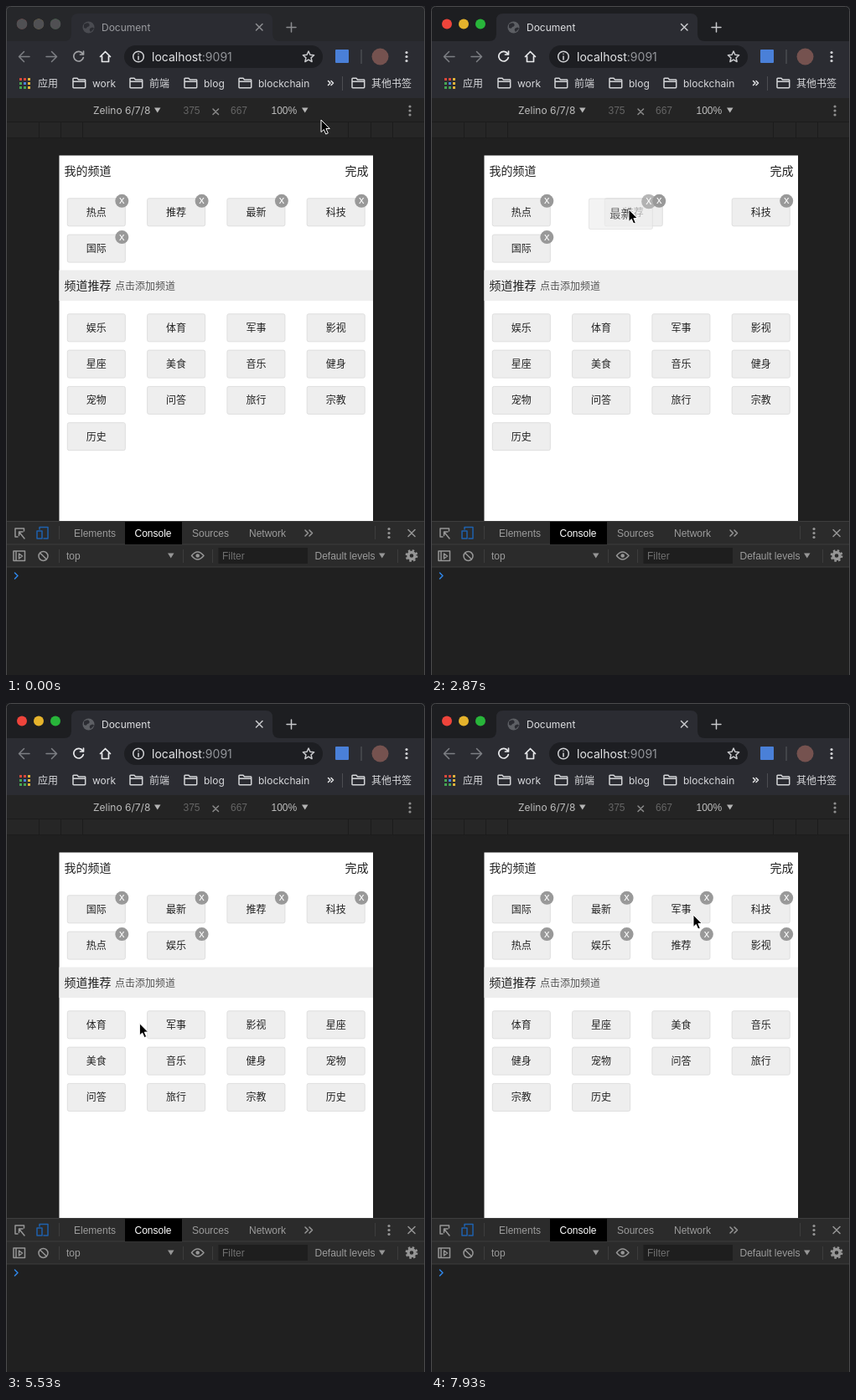
An HTML page for the animation above (8 s loop, 500 by 799 pixels).

```html
<!DOCTYPE html>
<html lang="zh-CN">
<head>
<meta charset="utf-8">
<title>Document</title>
<style>
  html, body { margin: 0; width: 100%; height: 100%; overflow: hidden; background: #202020; }
  svg { display: block; }
  text { font-family: Inter, "Noto Sans CJK SC", "Noto Sans CJK", sans-serif; font-size: 12px; }
  .cjk text { font-family: "Noto Sans CJK SC", "Noto Sans CJK", sans-serif; fill: #222; }
  .cjk .head { font-size: 14px; }
  .cjk .x { font: 13px "Liberation Sans", Arial, sans-serif; fill: #fff; }
  .dev text { font-family: "Liberation Sans", Arial, sans-serif; fill: #9c9c9c; }
  .line { fill: none; stroke-width: 1.5; stroke-linecap: round; stroke-linejoin: round; }
  .mid { text-anchor: middle; }
  .idle { animation: idle 8s step-end infinite; }
  .wake { animation: wake 8s step-end infinite; }
  .focus { animation: focus 8s step-end infinite; }
  @keyframes idle { 0% { opacity: 1; } 7.5%, to { opacity: 0; } }
  @keyframes wake { 0% { opacity: .62; } 7.5%, to { opacity: 1; } }
  @keyframes focus { 0% { opacity: 0; } 7.5% { opacity: 1; } 22.5%, to { opacity: 0; } }
</style>
</head>
<body>
<svg width="500" height="799" viewBox="0 0 500 799">
  <defs>
    <path id="folder" class="line" stroke="#d4d5d8" stroke-width="1.3"
      d="M1 11.5V1.5Q1 .8 1.7.8H6L7.5 2.6H15Q15.7 2.6 15.7 3.3V11.5Q15.7 12.2 15 12.2H1.7Q1 12.2 1 11.5ZM1 4.8H15.7"/>
    <g id="dots"><circle cy="-5" r="1.6"/><circle r="1.6"/><circle cy="5" r="1.6"/></g>
    <path id="down" d="M0 0H7.5L3.75 6Z"/>
  </defs>

  <!-- title bar -->
  <rect width="500" height="799" fill="#202020"/>
  <rect width="500" height="44" fill="#1d1e21"/>
  <rect class="idle" width="500" height="44" fill="#26272a"/>
  <circle cx="19" cy="21.5" r="6" fill="#ee443b"/>
  <circle cx="39" cy="21.5" r="6" fill="#e5b32c"/>
  <circle cx="59" cy="21.5" r="6" fill="#28b53a"/>
  <g class="idle" fill="#505053">
    <circle cx="19" cy="21.5" r="6.3"/><circle cx="39" cy="21.5" r="6.3"/><circle cx="59" cy="21.5" r="6.3"/>
  </g>
  <path fill="#2b2c32" d="M69 42Q78 42 78 33V17Q78 9 86 9H310Q318 9 318 17V33Q318 42 327 42H500V110H0V42Z"/>
  <g class="wake">
    <circle cx="98.5" cy="25.5" r="7" fill="#5d5f64"/>
    <path fill="#2b2c32" d="M93 22Q97 19 99 21Q101 24 97 25Q96 28 93 26ZM100 27Q104 24 105 27L101 31Q99 29 100 27Z"/>
    <text x="114" y="29.5" fill="#dfe0e3">Document</text>
    <path class="line" stroke="#c9cacd" d="M298.5 21.5L306 29M306 21.5L298.5 29"/>
    <path class="line" stroke="#c9cacd" d="M335 25.5H346M340.5 20V31"/>
  </g>

  <!-- navigation -->
  <g class="line">
    <path stroke="#7d7f84" d="M28 60.5H16M21.5 54.5L15.5 60.5L21.5 66.5M48 60.5H60M54.5 54.5L60.5 60.5L54.5 66.5"/>
    <path class="wake" stroke="#e8e9eb" stroke-width="1.7" d="M91.5 57A5.8 5.8 0 1 0 92.3 61.5M92.5 54V58H88.5"/>
    <path stroke="#e8e9eb" stroke-width="1.7" d="M112.5 60.5L118.5 54.5L124.5 60.5M114.5 60V66.5H122.5V60"/>
  </g>
  <rect x="141" y="47" width="237" height="27" rx="13.5" fill="#1d1e22"/>
  <circle class="line" cx="158" cy="60.5" r="6.3" stroke="#d2d3d6"/>
  <path class="line" stroke="#d2d3d6" d="M158 60V64M158 57.2V57.3"/>
  <text x="174" y="65.5" style="font-size:14px" fill="#e4e5e7">localhost<tspan fill="#93959a">:9091</tspan></text>
  <path class="line" stroke="#c9cacd" d="M361 54L362.9 58.3L367.6 58.8L364.1 61.9L365.1 66.5L361 64.1L356.9 66.5L357.9 61.9L354.4 58.8L359.1 58.3Z"/>
  <rect x="393" y="52" width="16" height="16" rx="1" fill="#4a80d8"/>
  <path stroke="#5b5c61" d="M424 52V69"/>
  <circle cx="446.5" cy="60.5" r="10" fill="#75524f"/>
  <use href="#dots" x="478" y="60.5" fill="#d2d3d6"/>

  <!-- bookmarks -->
  <g id="apps"></g>
  <g fill="#d8d9dc">
    <use href="#folder" x="79" y="85.5"/><use href="#folder" x="147" y="85.5"/>
    <use href="#folder" x="212" y="85.5"/><use href="#folder" x="277" y="85.5"/>
    <use href="#folder" x="412" y="85.5"/>
    <text x="38" y="96.5">应用</text><text x="103" y="96.5">work</text>
    <text x="171" y="96.5">前端</text><text x="236" y="96.5">blog</text>
    <text x="301" y="96.5">blockchain</text><text x="436" y="96.5">其他书签</text>
  </g>
  <path class="line" stroke="#e4e5e7" d="M384.5 89.5L387 92L384.5 94.5M388 89.5L390.5 92L388 94.5"/>
  <path stroke="#4c4d52" d="M401.5 84V101"/>

  <!-- device bar -->
  <g class="dev">
    <rect y="110" width="500" height="28" fill="#242424"/>
    <rect class="focus" x="96" y="114" width="92" height="21" fill="#3a3a3a"/>
    <text x="104" y="128.5" style="font-family:Inter,sans-serif;fill:#bdbdbd">Zelino 6/7/8</text>
    <g fill="#b5b5b5"><use href="#down" x="177" y="121.5"/><use href="#down" x="353" y="121.5"/></g>
    <g opacity=".55"><text x="211.5" y="128.5">375</text><text x="268" y="128.5">667</text></g>
    <path class="line" stroke="#8a8a8a" d="M247 123L253.5 129.5M253.5 123L247 129.5"/>
    <text x="316.5" y="128.5" style="fill:#bdbdbd">100%</text>
    <use href="#dots" x="482" y="125" fill="#8f8f8f"/>
    <rect y="138" width="500" height="19" fill="#262626"/>
    <path stroke="#1c1c1c" d="M0 138.5H500M39.5 139V157M65.5 139V157M91.5 139V157M408.5 139V157M435.5 139V157M461.5 139V157M0 157.5H500"/>
  </g>

  <!-- page -->
  <rect x="63.5" y="178.5" width="374.5" height="437" fill="#fff"/>
  <g class="cjk">
    <rect x="63.5" y="315.5" width="374.5" height="36.5" fill="#eee"/>
    <text class="head" x="69.5" y="201.5">我的频道</text>
    <text class="head" x="404.5" y="201.5">完成</text>
    <text class="head" x="69.5" y="338.5">频道推荐</text>
    <text x="130" y="338.5" style="fill:#555">点击添加频道</text>
    <g id="chips"></g>
  </g>

  <!-- developer tools -->
  <g class="dev">
    <rect y="615" width="500" height="55" fill="#2b2b2b"/>
    <rect y="670" width="500" height="129" fill="#202020"/>
    <path stroke="#3d3d3d" d="M0 615.5H500M0 643H500M0 670H500M63.5 621V637M440.5 621V637M63.5 649V665M211.5 649V665M246.5 649V665M467.5 649V665"/>
    <rect x="142" y="616" width="68" height="27" fill="#000"/>
    <g class="line" stroke="#969696">
      <path d="M14 634H11V624H21.5V627M15.5 628L22 636M15.5 632.5V628H20"/>
      <path stroke="#1f62ae" d="M40 625V622.5H50V636H45M37 627H43V636H37Z"/>
      <path d="M357 626L360.5 629.5L357 633M362 626L365.5 629.5L362 633M480 625.5L488 633.5M488 625.5L480 633.5"/>
      <path d="M9 651H22.5V662.5H9ZM12 651V662.5M15.5 654L19.5 657L15.5 660Z"/>
      <circle cx="44.5" cy="657" r="5.5"/><path d="M40.7 653.2L48.3 660.8"/>
      <path d="M221.5 656.5Q228.5 647.5 236 656.5Q228.5 665.5 221.5 656.5Z"/>
      <circle cx="484" cy="656.5" r="4" stroke-width="3.4"/>
      <circle cx="484" cy="656.5" r="6.3" stroke-width="2.2" stroke-linecap="butt" stroke-dasharray="2.5 2.448"/>
    </g>
    <circle cx="228.7" cy="656.5" r="2.3" fill="#969696"/>
    <use href="#dots" x="457" y="629.5" fill="#969696"/>
    <text x="81" y="633.5">Elements</text>
    <text x="153.5" y="633.5" style="fill:#fff">Console</text>
    <text x="222" y="633.5">Sources</text>
    <text x="290" y="633.5">Network</text>
    <text x="72" y="660.5">top</text>
    <rect x="253.5" y="647" width="106.5" height="19" fill="#1e1e1e"/>
    <text x="258" y="661" style="fill:#707070">Filter</text>
    <text x="368.5" y="660.5">Default levels</text>
    <g fill="#969696"><use href="#down" x="193" y="653.5"/><use href="#down" x="445" y="653.5"/></g>
    <path class="line" stroke="#2f86e8" d="M10.5 677L14 680.5L10.5 684"/>
  </g>
  <rect x=".5" y=".5" width="499" height="806" rx="5" fill="none" stroke="#4b4b4d"/>
  <path id="cursor" fill="#000" stroke="#fff" d="M0 0V14.5L3.3 11.5L5.7 17L8.3 15.9L5.9 10.5H10.3Z"/>
</svg>
<script>
(() => {
  const LOOP = 8000, SETTLE = 120;
  const byId = id => document.getElementById(id);
  const add = (parent, tag, attrs = {}, text = "") => {
    const el = document.createElementNS("http://www.w3.org/2000/svg", tag);
    for (const k in attrs) el.setAttribute(k, attrs[k]);
    el.textContent = text;
    return parent.appendChild(el);
  };
  const clamp = v => Math.min(1, Math.max(0, v));
  const ease = v => v * v * (3 - 2 * v);
  const mix = (a, b, v) => a + (b - a) * v;

  const [red, yellow, green, blue] = ["#d9483b", "#e0b23a", "#45a552", "#4a80d8"];
  [red, red, yellow, green, blue, yellow, green, green, yellow].forEach((fill, i) =>
    add(byId("apps"), "rect",
      { x: 16 + i % 3 * 5, y: 86 + Math.floor(i / 3) * 5, width: 3, height: 3, fill }));

  // Pointer path: time, x, y
  const path = [
    [0, 376, 136], [100, 374, 138], [700, 300, 228], [1200, 293, 244], [1500, 293, 244],
    [1800, 308, 241], [2300, 308, 241], [2870, 236, 243], [3100, 212, 244], [3300, 210, 244],
    [3800, 124, 250], [4330, 124, 250], [4580, 124, 291], [4870, 124, 291], [5130, 109, 384],
    [5280, 109, 384], [5670, 180, 382], [5730, 181, 382], [6480, 181, 382], [7000, 313, 298],
    [7300, 313, 298], [7700, 313, 253], [LOOP, 313, 253]
  ];
  function pointer(t) {
    const i = Math.max(1, path.findIndex(p => p[0] >= t));
    const [a, b] = [path[i - 1], path[i]];
    const v = ease(clamp((t - a[0]) / (b[0] - a[0])));
    return [mix(a[1], b[1], v), mix(a[2], b[2], v)];
  }

  // Swaps glide; additions from the lower list jump.
  const changes = [
    { t: 2740, swap: [1, 2], dur: 300 },
    { t: 4430, swap: [0, 4], dur: 250 },
    { t: 5200, take: 0 },
    { t: 6000, take: 1 },
    { t: 6270, take: 1 },
    { t: 7560, swap: [2, 6], dur: 300 }
  ];
  const drags = [
    { name: "最新", lift: 2000, drop: 3200 },
    { name: "热点", lift: 3900, drop: 4600 },
    { name: "军事", lift: 7150, drop: 7790 }
  ];

  const mine = "热点 推荐 最新 科技 国际".split(" ");
  const more = "娱乐 体育 军事 影视 星座 美食 音乐 健身 宠物 问答 旅行 宗教 历史".split(" ");
  const chips = {};
  for (const name of [...mine, ...more]) {
    const g = add(byId("chips"), "g");
    add(g, "rect", { x: -34.5, y: -16.5, width: 69, height: 33, rx: 2, fill: "#eee", stroke: "#dedede" });
    add(g, "text", { class: "mid", y: 4.5 }, name);
    const badge = add(g, "g", { transform: "translate(30.5 -13.5)" });
    add(badge, "circle", { r: 8, fill: "#999" });
    add(badge, "text", { class: "mid x", y: 3.5 }, "x");
    chips[name] = { g, badge, keys: [] };
  }

  function record(t, dur = 0) {
    [mine, more].forEach((list, lower) => list.forEach((name, i) => chips[name].keys.push({
      t, dur, lower,
      x: 107.8 + i % 4 * 95.3,
      y: (lower ? 384.3 : 246.3) + Math.floor(i / 4) * 43.3
    })));
  }
  record(0);
  for (const { t, swap, take, dur } of changes) {
    if (swap) {
      const [a, b] = swap;
      [mine[a], mine[b]] = [mine[b], mine[a]];
    } else mine.push(...more.splice(take, 1));
    record(t, dur);
  }

  function place(chip, t) {
    let i = chip.keys.length - 1;
    while (i && chip.keys[i].t > t) i--;
    const to = chip.keys[i], from = chip.keys[Math.max(0, i - 1)];
    const v = to.dur ? ease(clamp((t - to.t) / to.dur)) : 1;
    return { x: mix(from.x, to.x, v), y: mix(from.y, to.y, v), lower: to.lower };
  }

  let front = "";
  function raise(name) {
    if (front === name) return;
    front = name;
    byId("chips").append(chips[name].g);
  }

  function render(t) {
    byId("cursor").setAttribute("transform", `translate(${pointer(t)})`);
    for (const name in chips) {
      const chip = chips[name];
      let { x, y, lower } = place(chip, t), up = 0;
      const drag = drags.find(d => d.name === name && t >= d.lift && t < d.drop + SETTLE);
      if (drag) {
        const home = place(chip, drag.lift), grab = pointer(drag.lift);
        const hand = pointer(Math.min(t, drag.drop));
        const back = ease(clamp((t - drag.drop) / SETTLE));
        x = mix(home.x + hand[0] - grab[0], x, back);
        y = mix(home.y + hand[1] - grab[1], y, back);
        up = clamp((t - drag.lift) / 80) * (1 - back);
        raise(name);
      }
      chip.g.setAttribute("transform", `translate(${x} ${y}) scale(${1 + up * .1})`);
      chip.g.setAttribute("opacity", 1 - up * .3);
      chip.badge.setAttribute("visibility", lower ? "hidden" : "visible");
    }
  }

  const start = performance.now();
  function tick() {
    render((performance.now() - start) % LOOP);
    requestAnimationFrame(tick);
  }
  tick();
})();
</script>
</body>
</html>
```
